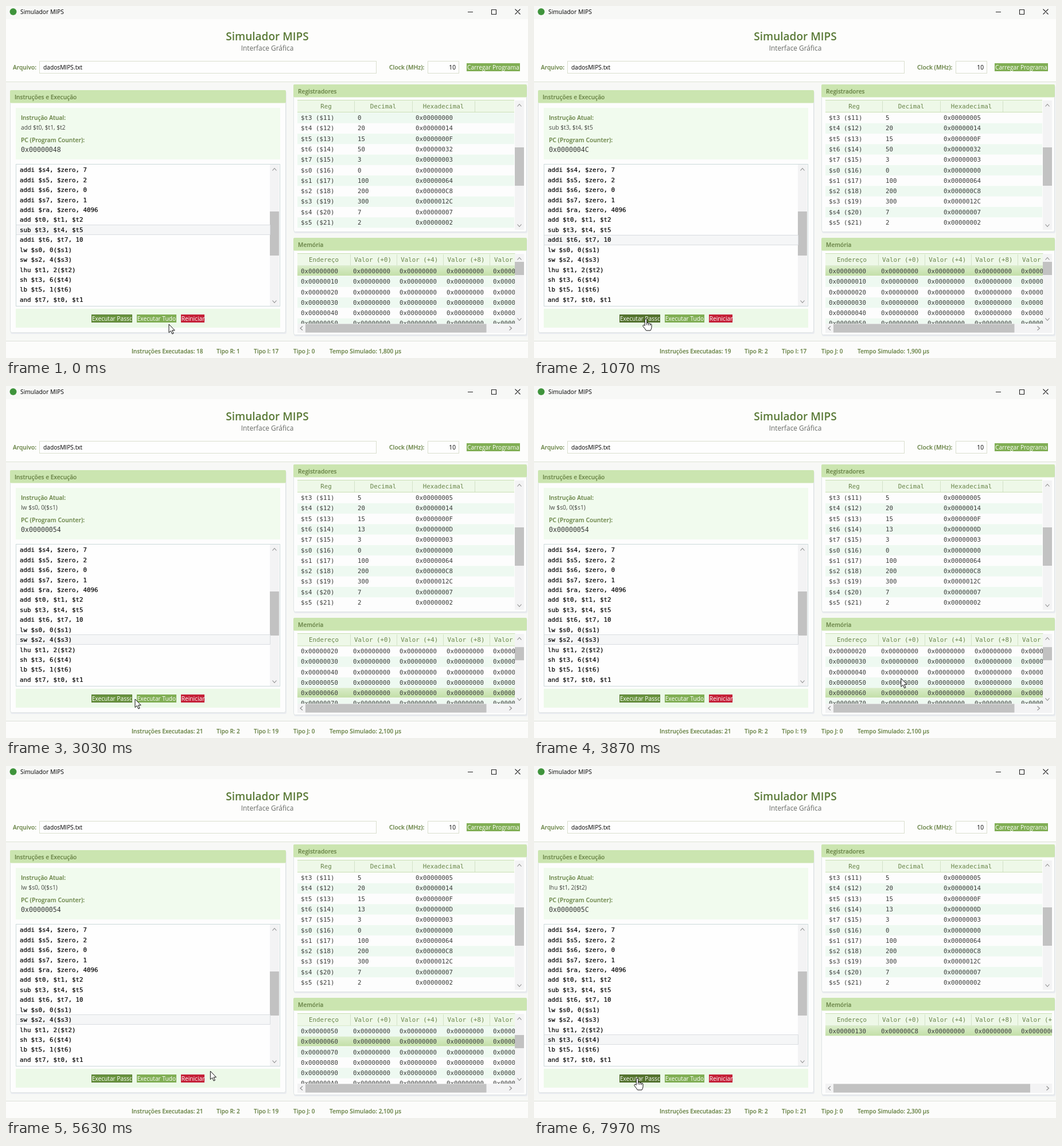
An HTML page for the animation above (8000 ms loop, 910 px wide and 615 px high).

```html
<!DOCTYPE html>
<html lang="pt">
<head>
<meta charset="utf-8">
<title>Simulador MIPS</title>
<style>
  html, body { margin: 0; width: 100%; height: 100%; overflow: hidden; background: #f8f9f7; }
  svg { display: block; position: absolute; left: 0; top: 0; }
  text { font: 10.2px "Open Sans", "Noto Sans", sans-serif; fill: #454843; white-space: pre; }
  .bold { font-weight: 600; fill: #6c864a; stroke: #6c864a; stroke-width: .15; }
  .title { fill: #5a7a37; stroke: none; }
  .subtitle { fill: #666965; }
  .mono { font: 10.8px "DejaVu Sans Mono", monospace; fill: #3a3c3a; }
  .code { fill: #000; }
  .mono.code { stroke: #000; stroke-width: .2; }
  .head { fill: #69854a; }
  .white { fill: #fff; }
  .mid { text-anchor: middle; }
  .end { text-anchor: end; }
</style>
</head>
<body>
<svg width="910" height="615" viewBox="0 0 910 615">
  <defs>
    <linearGradient id="selected" x2="0" y2="1">
      <stop stop-color="#d9ecc9"/><stop offset="1" stop-color="#c3dfa8"/>
    </linearGradient>
    <clipPath id="step"><rect x="149" y="538" width="70.5" height="16"/></clipPath>
    <clipPath id="memNarrow"><rect x="508" y="432" width="379.5" height="123"/></clipPath>
    <clipPath id="memWide"><rect x="508" y="432" width="395" height="123"/></clipPath>
  </defs>
  <g id="chrome"></g>
  <g id="content"></g>
  <g id="buttons"></g>
  <g id="pointer" stroke="#111" stroke-linejoin="round" fill="#fff">
    <path id="arrow" d="M0 0V14.6L3.4 11.5L5.8 17L8.1 16L5.7 10.7H10.2Z"/>
    <path id="hand" d="M-1.7 11.5V1.3Q-1.5 -.4 0 -.4T1.7 1.3V6.8Q4.5 5.7 4.7 7.6Q7.2 6.7 7.5 8.5Q10 7.9 10 10V14.5Q9.8 17.5 8 20H.5Q-1.6 16.6 -5 12.6Q-5.7 11-4 10.3Q-2.7 10.3-1.7 11.5ZM1.7 6.8V10.5M4.7 7.6V11M7.5 8.5V11.2"/>
  </g>
</svg>
<script>
const LOOP = 8000;
const PROGRAM = ['addi $s4, $zero, 7', 'addi $s5, $zero, 2', 'addi $s6, $zero, 0', 'addi $s7, $zero, 1',
  'addi $ra, $zero, 4096', 'add $t0, $t1, $t2', 'sub $t3, $t4, $t5', 'addi $t6, $t7, 10', 'lw $s0, 0($s1)',
  'sw $s2, 4($s3)', 'lhu $t1, 2($t2)', 'sh $t3, 6($t4)', 'lb $t5, 1($t6)', 'and $t7, $t0, $t1'];
const REGISTERS = ['t3', 't4', 't5', 't6', 't7', 's0', 's1', 's2', 's3', 's4', 's5'];
const VALUES = [0, 20, 15, 50, 3, 0, 100, 200, 300, 7, 2];
const MEM_X = [514, 605, 686, 768, 849];
const STEP_TIMES = [1000, 1500, 2300, 6800, 7400];
const SCROLL_TIME = 4200;
// time, x, y of the pointer tip
const PATH = [[0, 284, 556], [470, 271, 535], [900, 195, 547], [2500, 195, 547], [3030, 225, 547],
  [4000, 661, 509], [5100, 661, 509], [6000, 180, 547], [LOOP, 180, 546]];
const BUTTON_Y = 539, BUTTON_H = 14;
const BUTTONS = [
  { label: 'Executar Passo', x: 149, w: 71, fill: '#69933f', hover: '#55742f' },
  { label: 'Executar Tudo', x: 228, w: 69, fill: '#80ae54', hover: '#69933f' },
  { label: 'Reiniciar', x: 305, w: 41, fill: '#c42038', hover: '#a51b30' }];

const $ = id => document.getElementById(id);
const hex = n => '0x' + n.toString(16).toUpperCase().padStart(8, '0');
const rect = (x, y, w, h, fill, extra = '') =>
  `<rect x="${x}" y="${y}" width="${w}" height="${h}" fill="${fill}" ${extra}/>`;
const frame = (x, y, w, h, fill, stroke) => rect(x + .5, y + .5, w - 1, h - 1, fill, `stroke="${stroke}"`);
const text = (x, y, str, cls = '', size) =>
  `<text x="${x}" y="${y}" class="${cls}"${size ? ` style="font-size:${size}px"` : ''}>${str}</text>`;
const line = (d, color, width = 1) => `<path d="${d}" fill="none" stroke="${color}" stroke-width="${width}"/>`;
const chevron = (x, y, dx, dy) =>
  line(`M${x - 3.5 * dy - 2 * dx} ${y - 3.5 * dx - 2 * dy}L${x + 2 * dx} ${y + 2 * dy}L${x + 3.5 * dy - 2 * dx} ${y + 3.5 * dx - 2 * dy}`, '#8d8d8d', 1.1);

function panel(x, y, w, h, title) {
  return rect(x + 1, y + 2, w, h, '#e9ebf0', 'rx="3"') +
    rect(x + .5, y + .5, w - 1, h - 1, '#fdfdfd', 'rx="3" stroke="#dfe4e4"') +
    rect(x, y, w, 22.5, '#cbe5b0', 'rx="2"') + text(x + 8, y + 16, title, 'bold');
}

function vScroll(x, top, bottom, thumbY, thumbH) {
  return rect(x, top, 16, bottom - top, '#f3f3f4') + rect(x, thumbY, 16, thumbH, '#c2c2c2') +
    chevron(x + 8, top + 8.5, 0, -1) + chevron(x + 8, bottom - 7.5, 0, 1);
}

function drawChrome() {
  let s = rect(0, 0, 910, 615, '#f7f8f6') + rect(0, 23, 910, 109, '#fdfdfc') + rect(0, 132, 910, 1, '#dde3d4');
  s += '<circle cx="12.5" cy="10" r="6" fill="#3f943c"/>' + text(25, 14, 'Simulador MIPS', 'code', 10.3);
  s += line('M805 10.5H814M846.5 6.5H854.5V14.5H846.5ZM887.5 5.5L896.5 14.5M896.5 5.5L887.5 14.5', '#222', 1.1);
  s += text(455.5, 60, 'Simulador MIPS', 'bold title mid', 19) + text(455.5, 77.5, 'Interface Gráfica', 'subtitle mid', 11.9);
  s += text(12, 111, 'Arquivo:', 'bold') + frame(58, 96, 588, 22, '#fefefe', '#dadfce') + text(65, 111, 'dadosMIPS.txt', 'code');
  s += text(668, 111, 'Clock (MHz):', 'bold', 10.4) + frame(735, 96, 55, 22, '#fefefe', '#dadfce') + text(784, 111, '10', 'code end');
  s += rect(803, 100, 93, 14, '#80ae54') + text(804, 111, 'Carregar Programa', 'white');

  s += panel(7, 147, 481, 424, 'Instruções e Execução');
  s += rect(17, 178, 461, 90, '#f1fbee') + text(26, 199, 'Instrução Atual:', 'bold');
  s += text(26, 238, 'PC (Program Counter):', 'bold', 10.35);
  s += frame(17, 276, 461, 249, '#fefefe', '#cbd9da') + vScroll(460, 277, 524, 359, 77);
  s += rect(17, 529, 461, 33, '#ecf9e8');

  s += panel(501, 137, 407, 258, 'Registradores') + rect(508, 165, 378, 21, '#eef8e8');
  s += line('M508 164.5H886M508 185.5H886', '#c9dfb4') + line('M607.5 166V185M708.5 166V185M817.5 166V185', '#d3e2c8');
  s += text(558, 179, 'Reg', 'mono head mid') + text(657.5, 179, 'Decimal', 'mono head mid') + text(762.5, 179, 'Hexadecimal', 'mono head mid');
  s += vScroll(887, 165, 391, 247, 67);

  s += panel(501, 405, 407, 170, 'Memória');
  s += rect(0, 585, 910, 30, '#fcfcfb') + rect(0, 585, 910, 1, '#dde1da');
  $('chrome').innerHTML = s;
}

function drawRegisters(executed) {
  const parity = executed > 18 ? 1 : 0;
  return REGISTERS.map((name, i) => {
    const y = 186.5 + i * 18.28;
    let value = VALUES[i];
    if (name === 't3' && executed > 18) value = 5;
    if (name === 't6' && executed > 19) value = 13;
    return (i % 2 === parity ? rect(508, y, 378, 18.2, '#eef9f1') : '') +
      text(514, y + 12.7, `$${name} ($${i + 11})`, 'mono') + text(613, y + 12.7, value, 'mono') + text(714, y + 12.7, hex(value), 'mono');
  }).join('');
}

function drawMemory(executed, top) {
  const stored = executed > 21;
  const right = stored ? 903 : 887;
  let s = `<g clip-path="url(#${stored ? 'memWide' : 'memNarrow'})">` + rect(508, 433, 395, 21, '#eef8e8');
  s += line('M508 432.5H903M508 454H903', '#c9dfb4') + line('M600.5 434V453M681.5 434V453M762.5 434V453M843.5 434V453', '#d3e2c8');
  s += text(554, 447, 'Endereço', 'mono head mid');
  ['0', '4', '8', 'C'].forEach((offset, i) => s += text(607 + i * 81.3, 447, `Valor (+${offset})`, 'mono head'));
  for (let i = 0; i < (stored ? 1 : 6); i++) {
    const row = stored ? 19 : top + i;
    const y = 454.3 + i * 18.28;
    const selected = stored || row === (executed > 20 ? 6 : 0);
    if (selected) s += rect(508, y, 395, 17, 'url(#selected)');
    else if (row % 2) s += rect(508, y, 395, 18.2, '#eef9f1');
    MEM_X.forEach((x, col) => s += text(x, y + 12.7, hex(col ? (stored && col === 1 ? 200 : 0) : row * 16), 'mono'));
  }
  s += '</g>';
  if (!stored) s += vScroll(887, 433, 555, 447 + top * 4.6, 23);
  s += rect(508, 555, 395, 16, '#f3f3f4') + rect(522, 555.5, stored ? 343 : 315.5, 15, '#c2c2c2');
  return s + chevron(515, 563, -1, 0) + chevron(right - 7.5, 563, 1, 0);
}

function drawContent(executed, top) {
  const next = executed - 12;
  let s = text(26, 216, PROGRAM[next - 1], '', 10.3) + text(26, 255, hex(executed * 4), 'mono', 11.6);
  PROGRAM.forEach((code, i) => {
    const y = 277.6 + i * 17.42;
    if (i === next) s += rect(18, y, 442, 17.4, '#f5f6f7') +
      line(`M18 ${Math.round(y) + .5}H460.5V${Math.round(y + 17) + .5}H18`, '#dadde1');
    s += text(24, y + 12.7, code, 'mono code');
  });
  const typeR = executed > 18 ? 2 : 1;
  [[219, `Instruções Executadas: ${executed}`], [367, `Tipo R: ${typeR}`], [432, `Tipo I: ${executed - typeR}`],
    [501, 'Tipo J: 0'], [564, `Tempo Simulado: ${(executed * 100).toLocaleString('en-US')} µs`]]
    .forEach(([x, str]) => s += text(x, 607, str, 'bold', 10));
  $('content').innerHTML = s + drawRegisters(executed) + drawMemory(executed, top);
}

function drawButtons(hovered) {
  $('buttons').innerHTML = BUTTONS.map((b, i) =>
    rect(b.x, BUTTON_Y, b.w, BUTTON_H, i === hovered ? b.hover : b.fill) +
    `<g${i ? '' : ' clip-path="url(#step)"'}>${text(b.x + .7, 550, b.label, 'white')}</g>` +
    (i ? '' : rect(b.x + .5, BUTTON_Y + .5, b.w - 1, BUTTON_H - 1, 'none', 'stroke="#3f5f20" stroke-dasharray="1 1"'))).join('');
}

function pointerAt(t) {
  const i = PATH.findIndex(key => key[0] > t);
  const [t0, x0, y0] = PATH[i - 1], [t1, x1, y1] = PATH[i];
  const u = (t - t0) / (t1 - t0), e = u * u * (3 - 2 * u);
  return [x0 + (x1 - x0) * e, y0 + (y1 - y0) * e];
}

let contentKey, hoverKey;
function render(now) {
  const t = now % LOOP;
  const executed = 18 + STEP_TIMES.filter(at => t >= at).length;
  const top = executed < 21 ? 0 : t < SCROLL_TIME ? 2 : 5;
  const [x, y] = pointerAt(t);
  const hovered = BUTTONS.findIndex(b => x >= b.x && x < b.x + b.w && y >= BUTTON_Y && y < BUTTON_Y + BUTTON_H);
  if (contentKey !== executed + '/' + top) {
    contentKey = executed + '/' + top;
    drawContent(executed, top);
  }
  if (hoverKey !== hovered) drawButtons(hoverKey = hovered);
  $('pointer').setAttribute('transform', `translate(${x.toFixed(1)} ${y.toFixed(1)})`);
  $('arrow').style.display = hovered < 0 ? '' : 'none';
  $('hand').style.display = hovered < 0 ? 'none' : '';
}

drawChrome();
const start = performance.now();
function tick() {
  render(performance.now() - start);
  requestAnimationFrame(tick);
}
tick();
</script>
</body>
</html>
```
